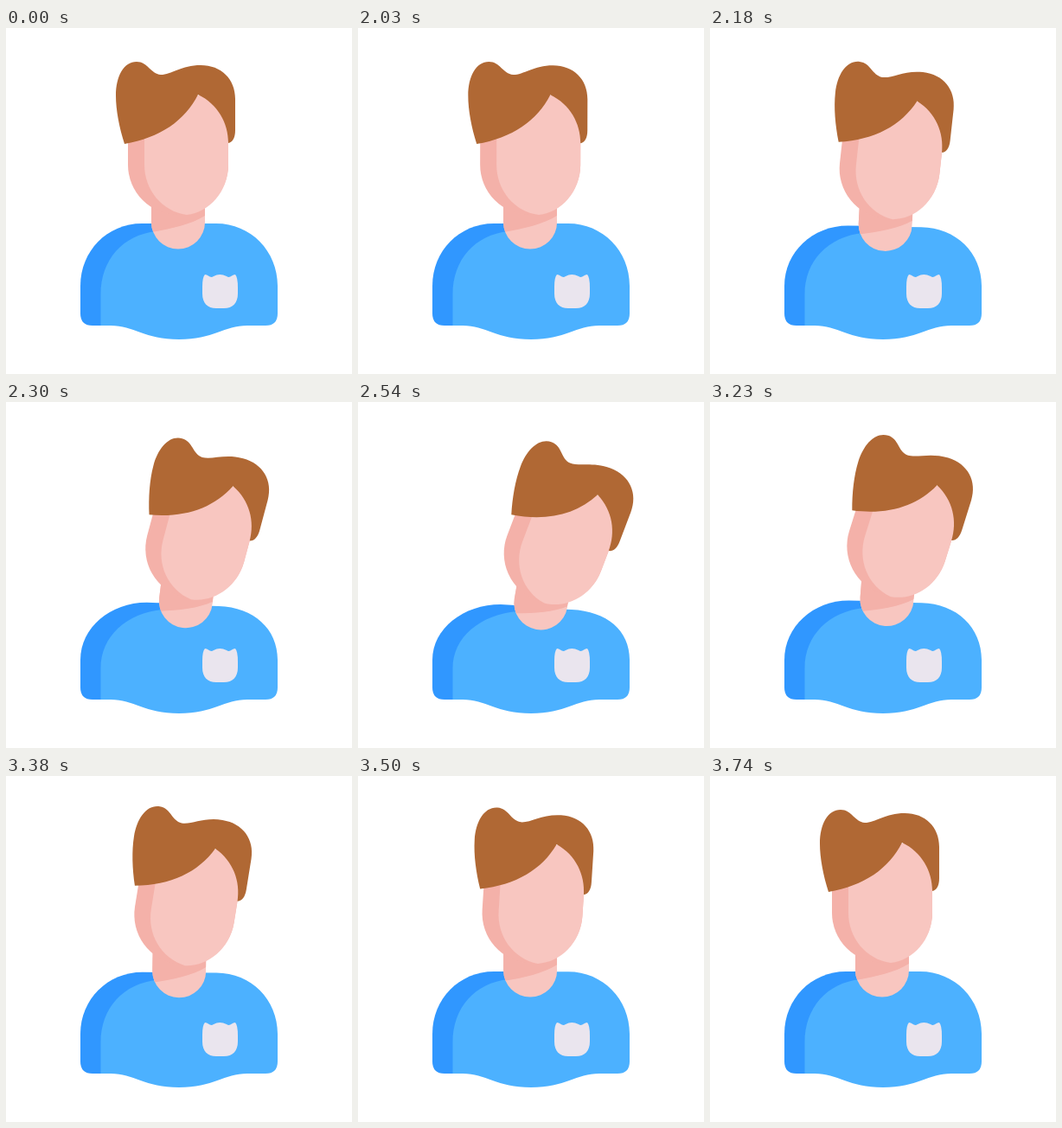
An HTML page that plays this animation: 400x400 px, repeating every 3770 ms.

```html
<!DOCTYPE html>
<html lang="en">
<head>
<meta charset="utf-8">
<title>Head tilt</title>
<style>
  html, body { margin: 0; width: 100%; height: 100%; overflow: hidden; background: #fff; }
  svg { display: block; width: 100vw; height: 100vh; }
</style>
</head>
<body>
<svg viewBox="0 0 400 400">
  <defs>
    <clipPath id="neckClip"><path d="M168 180H230V224.5A31 31 0 0 1 168 224.5Z"/></clipPath>
  </defs>
  <path id="shirtDark" fill="#3097ff"/>
  <path id="shirt" fill="#4cb1ff"/>
  <path fill="#eae5ee" d="M230 285C234 285 236 290 240 287Q247 283 255 287C259 290 261 285 265 285Q268 288 268 300V307C268 318 262 324 252 324H243C233 324 227 318 227 307V299Q227 288 230 285Z"/>
  <g id="neck">
    <g clip-path="url(#neckClip)">
      <path fill="#f8c6c0" d="M160 170H240V265H160Z"/>
      <path id="shade" fill="#f4b1a9" d="M150 160H250V207L230 217C214 227 192 232 168 236L150 238Z"/>
    </g>
  </g>
  <g id="head">
    <path fill="#f4b1a9" d="M141 78H257V158A58 58 0 0 1 141 158Z"/>
    <path fill="#f8c6c0" d="M160 78H257V158C257 189 235 213 209 216C180 212 160 187 160 158Z"/>
    <path fill="#b06834" d="M137 134C131 115 127 95 127 78C127 56 136 39 151 39C164 39 167 53 179 54C191 54 203 43 225 43C249 43 265 59 265 82V118C265 127 262 132 257 133C257 110 245 88 222 77C207 107 178 127 137 134Z"/>
  </g>
</svg>
<script>
const LOOP = 3770, STEP = 30, START = 2030;
const part = id => document.getElementById(id);
const mix = (a, b, p) => +(a + (b - a) * p).toFixed(2);

// Ease with flat ends; x1 and x2 are the horizontal handle positions.
function ease(x, x1, x2) {
  if (x <= 0) return 0;
  if (x >= 1) return 1;
  let low = 0, high = 1, s;
  for (let i = 0; i < 24; i++) {
    s = (low + high) / 2;
    const at = 3 * (1 - s) ** 2 * s * x1 + 3 * (1 - s) * s * s * x2 + s ** 3;
    if (at < x) low = s; else high = s;
  }
  return s * s * (3 - 2 * s);
}

function drawShirt(p) {
  const m = (a, b) => mix(a, b, p);
  const hem = "V330Q314 344 300 344H279C252 344 240 360 200 360";
  const right = `L${m(243, 247)} ${m(226, 240)}C${m(283, 288)} ${m(226, 242)} 314 ${m(258, 264)} 314 298${hem}`;
  const top = `${m(157, 165)} ${m(226, 234)}`;
  part("shirtDark").setAttribute("d",
    `M86 298C86 ${m(258, 262)} ${m(117, 122)} ${m(226, 234)} ${top}L${m(185, 182)} ${m(226, 235)}` +
    `V300L110 344H100Q86 344 86 330Z`);
  part("shirt").setAttribute("d",
    `M109.5 344V308C109.5 ${m(268, 272)} ${m(135, 141)} ${m(239, 246)} ${m(174, 184)} ${m(235, 242)}` +
    `L${m(190, 200)} ${m(226, 238)}${right}C160 360 148 344 121 344Z`);
}

function draw(time) {
  const t = START + Math.floor((time - START) / STEP) * STEP;
  const lean = ease((t - 2000) / 600, .4, .3);
  const body = lean - ease((t - 2990) / 580, .4, .3);
  const tilt = lean - ease((t - 3050) / 690, .4, .45);
  const lag = tilt - body;
  const dx = 12.5 * body, dy = 8 * body;

  drawShirt(body);
  part("neck").setAttribute("transform", `translate(${dx} ${dy}) rotate(${10 * body} 199 224.5)`);
  part("shade").setAttribute("transform", `translate(0 ${6 * tilt})`);
  part("head").setAttribute("transform",
    `translate(${dx - 3 * lag} ${dy - 5 * lag}) rotate(${21 * tilt} 182.5 204)`);
}

const begin = performance.now();
function tick() {
  draw((performance.now() - begin) % LOOP);
  requestAnimationFrame(tick);
}
tick();
</script>
</body>
</html>
```
